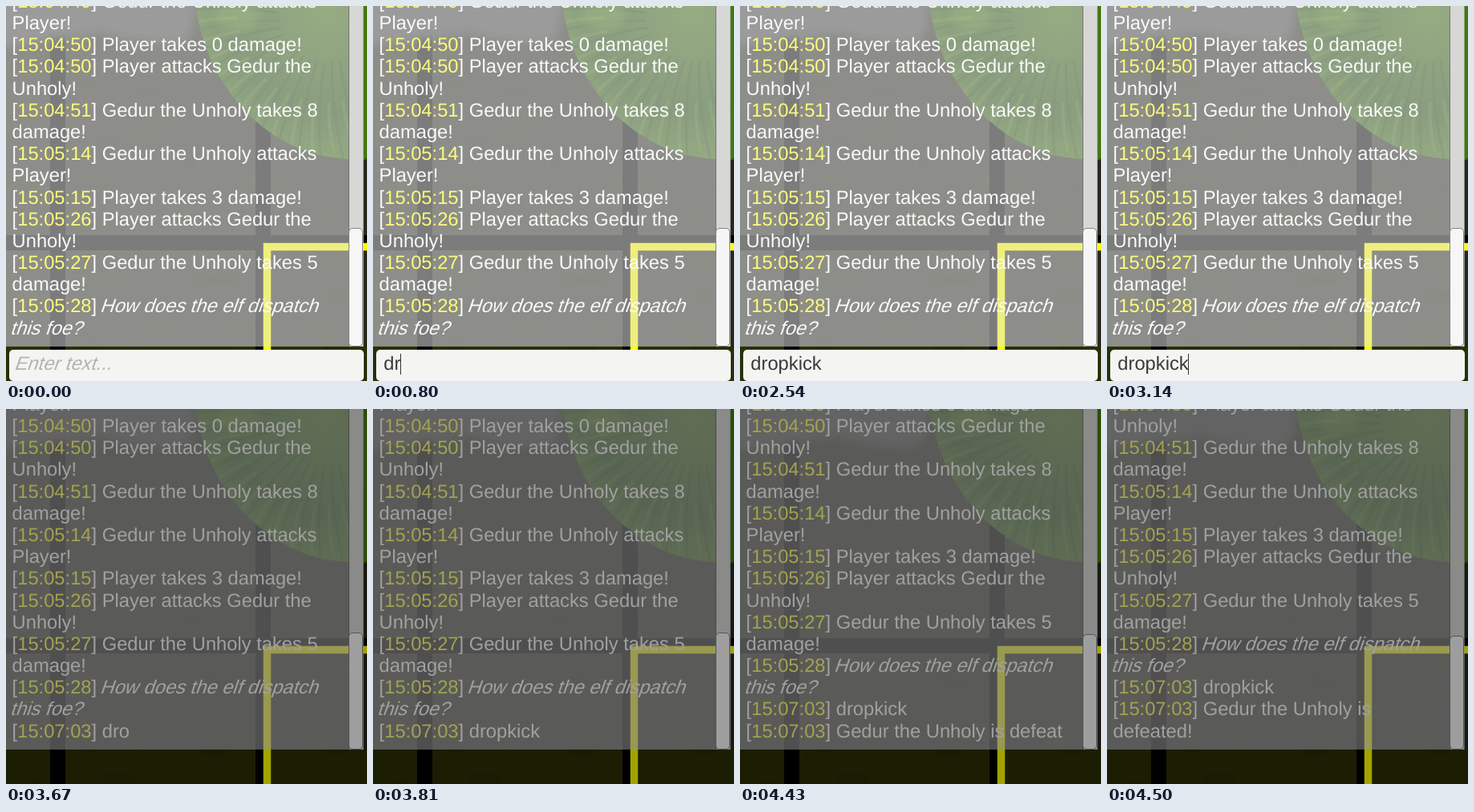
Recreate the animation shown at these times as an HTML page. Size 450 by 468 pixels, loop 5.03 s.

```html
<!DOCTYPE html>
<html lang="en">
<head>
<meta charset="utf-8">
<title>Battle log</title>
<style>
  html, body { margin: 0; width: 100%; height: 100%; overflow: hidden; background: #2a2e08; }
  #stage {
    position: relative; width: 450px; height: 468px; overflow: hidden;
    font: 23.72px/27.17px "Liberation Sans", Arial, sans-serif;
    font-kerning: none; text-rendering: geometricPrecision; white-space: pre;
  }
  #stage > * { position: absolute; }
  #scene { left: 0; top: 0; }
  #panel { left: 0; top: 0; width: 446px; height: 425px; background: rgba(226, 226, 228, .55); }
  #log { left: 7.6px; bottom: 51.3px; color: #fafafa; }
  #log b { font-weight: normal; color: #fdfd7c; }
  i { display: inline-block; font-style: normal; margin-left: -1px; transform: skewX(-19deg); }
  #track { left: 427px; top: 0; width: 18px; height: 425px; background: #d7d7d6; border-left: 1px solid #777; box-sizing: border-box; }
  #thumb {
    left: 426.5px; width: 18.5px; bottom: 43px; box-sizing: border-box;
    background: #f6f6f7; border: 1px solid #858585; border-radius: 5px;
  }
  #field { left: 4px; top: 428.5px; width: 441.5px; height: 39px; background: #f4f4f2; border-radius: 5px; }
  #field > * { position: absolute; left: 9.3px; top: 5.3px; }
  #hint { color: #b3b3af; }
  #typed { color: #3a3a3a; }
  #caret { display: inline-block; width: 1px; height: 26.6px; margin: 0 -2px 0 -.5px; background: #333; vertical-align: top; }
  #dim { inset: 0; background: rgba(0, 0, 0, .36); }
</style>
</head>
<body>
<div id="stage">
  <svg id="scene" width="450" height="468" viewBox="0 0 450 468">
    <defs>
      <radialGradient id="leafFill" gradientUnits="userSpaceOnUse" cx="400" cy="10" r="205">
        <stop offset="0" stop-color="#3a6a0c"/>
        <stop offset=".6" stop-color="#1f4a06"/>
        <stop offset="1" stop-color="#40720e"/>
      </radialGradient>
      <filter id="soft" x="-50%" y="-50%" width="200%" height="200%"><feGaussianBlur stdDeviation="6"/></filter>
      <clipPath id="leafClip"><use href="#leafShape"/></clipPath>
      <path id="leafShape" d="M236 0C243 42 256 76 277 105C303 144 345 174 390 186Q420 192 450 192V0Z"/>
    </defs>
    <rect width="450" height="468" fill="#25271a"/>
    <rect y="425" width="450" height="43" fill="#2a2f04"/>
    <g id="moss"></g>
    <path d="M55 0h19v468h-19zM311 0h19v468h-19zM0 286h450v19h-450z"/>
    <path d="M-20-20H236Q240 20 225 46Q165 50 120 34Q60 44-20 52Z" fill="#43443f" filter="url(#soft)"/>
    <use href="#leafShape" fill="url(#leafFill)"/>
    <g id="veins" clip-path="url(#leafClip)" fill="none"></g>
    <path d="M448 0V190" stroke="#44780e" stroke-width="4"/>
    <path d="M325.5 468V300.5H450" fill="none" stroke="#ff0" stroke-width="9.5"/>
  </svg>
  <div id="panel"></div>
  <div id="log"></div>
  <div id="track"></div>
  <div id="thumb"></div>
  <div id="field"><i id="hint">Enter text...</i><span id="typed"><span id="word"></span><span id="caret"></span></span></div>
  <div id="dim"></div>
</div>
<script>
const LOOP = 5030, SENT = 3670;
const $ = id => document.getElementById(id);
const foe = "Gedur the Unholy";
const command = "dropkick";
const outcome = foe + " is defeated!";

const history = [
  `[15:04:49] ${foe} attacks`, "Player!",
  "[15:04:50] Player takes 0 damage!",
  "[15:04:50] Player attacks Gedur the", "Unholy!",
  `[15:04:51] ${foe} takes 8`, "damage!",
  `[15:05:14] ${foe} attacks`, "Player!",
  "[15:05:15] Player takes 3 damage!",
  "[15:05:26] Player attacks Gedur the", "Unholy!",
  `[15:05:27] ${foe} takes 5`, "damage!",
  "[15:05:28] *How does the elf dispatch", "*this foe?"
];

// [start ms, letters shown]
const typing = [[0, 0], [200, 1], [800, 2], [870, 3], [1000, 4], [1330, 5], [1530, 6], [1930, 8]];
const commandEcho = [[3670, 3], [3740, 6], [3810, 8]];
const outcomeEcho = [[3880, 3], [3950, 6], [4020, 8], [4080, 11], [4150, 14],
  [4220, 17], [4290, 20], [4360, 23], [4430, 26], [4500, 29]];

const at = (steps, t) => steps.reduce((value, [start, next]) => t >= start ? next : value, 0);
const show = (id, visible) => $(id).style.display = visible ? "" : "none";

const markup = line => "<div>" + line
  .replace(/\[(.+?)\]/, "[<b>$1</b>]")
  .replace(/\*(.*)/, "<i>$1</i>") + "</div>";

function logLines(t) {
  const lines = [...history];
  if (t < SENT) return lines;
  lines.push("[15:07:03] " + command.slice(0, at(commandEcho, t)));
  const shown = at(outcomeEcho, t);
  if (shown === outcome.length) lines.push(`[15:07:03] ${foe} is`, "defeated!");
  else if (shown) lines.push("[15:07:03] " + outcome.slice(0, shown));
  return lines;
}

function paintScene() {
  let seed = 7;
  const random = () => (seed = seed * 16807 % 2147483647) / 2147483647;
  let moss = "";
  for (let k = 0; k < 90; k++) {
    const x = random() * 450, y = random() * 468, r = 5 + random() * 16;
    moss += `<ellipse cx="${x}" cy="${y}" rx="${r}" ry="${r / 3}" fill="${k % 2 ? "#1c2004" : "#34380f"}" opacity=".2"/>`;
  }
  $("moss").innerHTML = moss;

  let veins = "";
  for (let k = 0; k < 13; k++) {
    const a = 1.3 + k * .155, c = Math.cos(a), s = Math.sin(a);
    const p = (r, side = 0) => `${400 + r * c - side * s} ${10 + r * s + side * c}`;
    veins += `<path d="M${p(60)}Q${p(110, 9)} ${p(190)}" stroke="#123802" stroke-width="3" opacity=".45"/>`
      + `<path d="M${p(110, 10)}Q${p(140, 15)} ${p(172, 11)}" stroke="#5b8c20" stroke-width="4" opacity=".3"/>`;
  }
  veins += `<ellipse cx="288" cy="12" rx="26" ry="20" fill="#7aac1c" opacity=".3" filter="url(#soft)"/>`;
  $("veins").innerHTML = veins;
}

let lastLog = "";
function render(t) {
  const lines = logLines(t), html = lines.map(markup).join("");
  if (html !== lastLog) $("log").innerHTML = lastLog = html;
  $("thumb").style.height = 148 - 2.1 * (lines.length - history.length) + "px";

  const letters = at(typing, t), caretOn = t < 2540 || t >= 3140;
  $("word").textContent = command.slice(0, letters);
  show("hint", !letters);
  show("caret", letters && caretOn);
  show("field", t < SENT);
  show("dim", t >= SENT);
}

paintScene();
const begin = performance.now();
function tick() {
  render((performance.now() - begin) % LOOP);
  requestAnimationFrame(tick);
}
tick();
</script>
</body>
</html>
```
